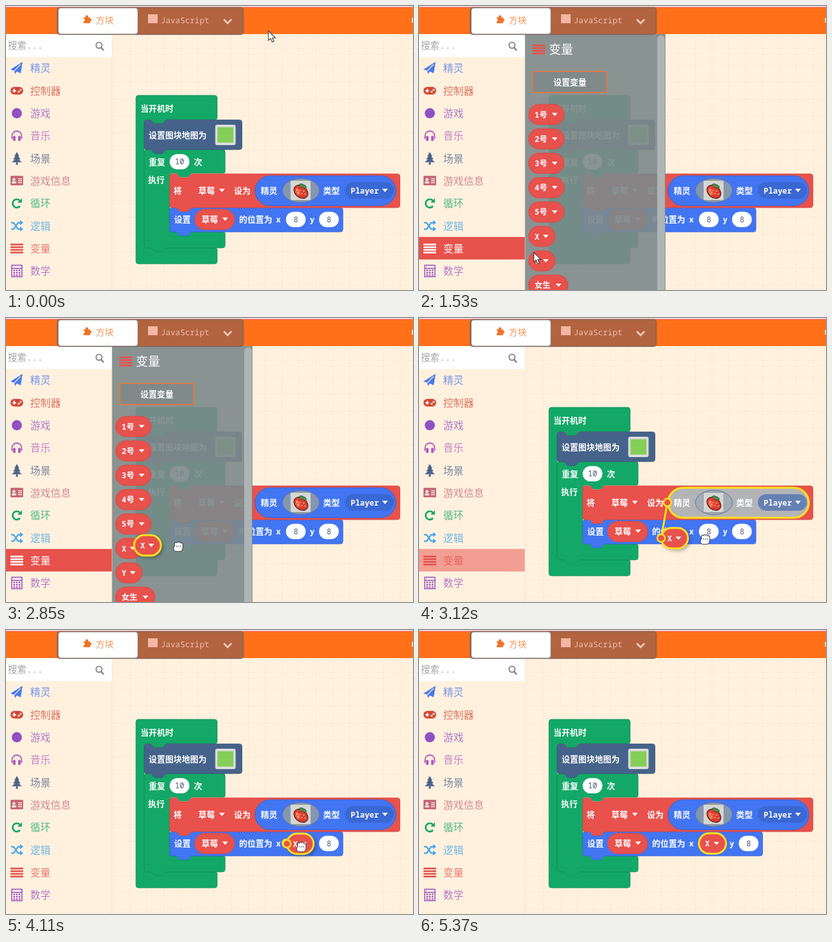
Recreate the animation shown at these times as an HTML page with a canvas. Size 639 px wide and 445 px high, loop 5.94 s.

```html
<!DOCTYPE html>
<html lang="zh">
<head>
<meta charset="utf-8">
<style>
html, body { margin: 0; width: 100%; height: 100%; overflow: hidden; background: #fff1de; }
canvas { display: block; }
</style>
</head>
<body>
<canvas id="stage" width="639" height="445"></canvas>
<script>
const c = document.getElementById('stage').getContext('2d');
const LOOP = 5940, OPEN = 1320, GRAB = 2740, CLOSE = 2860, DROP = 4600, GONE = 5350;
const LAG = 70; // the dragged block trails the pointer
const CJK = '"Noto Sans CJK SC", "Noto Sans CJK", sans-serif';
const MONO = '"Noto Sans Mono", "DejaVu Sans Mono", monospace';
const CREAM = '#fff1de', GREEN = '#13a867', RED = '#e8514c', BLUE = '#4275f2', SLATE = '#45638a', YELLOW = '#ffe01e';
const MENU = [
  ['精灵', '#4678ee'], ['控制器', '#d2493a'], ['游戏', '#9150c2'], ['音乐', '#b25cc0'],
  ['场景', '#48628a'], ['游戏信息', '#c66878'], ['循环', '#18a868'], ['逻辑', '#43a4ee'],
  ['变量', '#e2524f'], ['数学', '#9850c4']
];
const ROW = 35.3;

// Key points of the pointer: time, x, y
const PATH = [
  [0, 412, 39], [30, 412, 39], [600, 72, 346], [960, 65, 376], [OPEN, 66, 380], [1800, 326, 394],
  [2100, 240, 390], [2400, 202, 394], [2550, 196, 354], [GRAB, 196, 354], [3120, 448, 338],
  [3400, 550, 330], [3600, 494, 331], [4000, 463, 331], [4950, 462, 331], [GONE, 560, -22]
];

function pointer(t) {
  const i = Math.max(1, PATH.findIndex(p => p[0] >= t));
  const [t0, x0, y0] = PATH[i - 1], [t1, x1, y1] = PATH[i];
  const k = ramp(t, t0, t1);
  return [x0 + (x1 - x0) * k, y0 + (y1 - y0) * k];
}
function ramp(t, a, b) {
  return Math.max(0, Math.min(1, (t - a) / (b - a)));
}

function text(s, x, y, size, color, weight = 700, family = CJK, align = 'left') {
  c.font = `${weight} ${size}px ${family}`;
  c.fillStyle = color;
  c.textAlign = align;
  c.fillText(s, x, y + size * 0.37);
}
const label = (s, x, y) => text(s, x, y, 13, '#fff');
const code = (s, x, y) => text(s, x, y, 12.3, '#fff', 700, MONO);

function faded(alpha, fn) {
  c.globalAlpha = alpha;
  fn();
  c.globalAlpha = 1;
}
function moved(x, y, fn) {
  c.save();
  c.translate(x, y);
  fn();
  c.restore();
}
function paint(fill, edge, width = 1) {
  if (fill) { c.fillStyle = fill; c.fill(); }
  if (edge) { c.strokeStyle = edge; c.lineWidth = width; c.stroke(); }
}
function rect(x, y, w, h, color) {
  c.fillStyle = color;
  c.fillRect(x, y, w, h);
}
function round(x, y, w, h, r, fill, edge, width) {
  c.beginPath();
  c.roundRect(x, y, w, h, r);
  paint(fill, edge, width);
}
function disc(x, y, r, fill, edge, width) {
  c.beginPath();
  c.arc(x, y, r, 0, 7);
  paint(fill, edge, width);
}
function oval(x, y, rx, ry, tilt, fill, edge, width) {
  c.beginPath();
  c.ellipse(x, y, rx, ry, tilt, 0, 7);
  paint(fill, edge, width);
}
function trace(points) {
  c.beginPath();
  for (let i = 0; i < points.length; i += 2) c.lineTo(points[i], points[i + 1]);
}
function poly(points, fill, edge, width) {
  trace(points);
  c.closePath();
  paint(fill, edge, width);
}
function wire(points, color, width) {
  trace(points);
  paint(null, color, width);
}
const caret = (x, y) => poly([x - 4.5, y - 2.5, x + 4.5, y - 2.5, x, y + 2.5], '#fff');

// Puzzle notch along a top edge (dir 1) or a bottom edge (dir -1)
function notch(x, y, dir) {
  const a = x + 22.5 - dir * 13.5, at = d => a + dir * d;
  c.lineTo(a, y);
  c.bezierCurveTo(at(5), y, at(4), y + 6, at(9), y + 6);
  c.lineTo(at(18), y + 6);
  c.bezierCurveTo(at(23), y + 6, at(22), y, at(27), y);
}
function block(x, y, w, h, fill, edge, { hat, arm, top, bottom } = {}) {
  const r = x + w, b = y + h;
  c.beginPath();
  c.moveTo(x, y + 4);
  c.arcTo(x, y, x + 4, y, 4);
  if (!hat) notch(x, y, 1);
  c.arcTo(r, y, r, y + 4, 4);
  if (arm) {
    c.arcTo(r, top, r - 4, top, 3);
    notch(x + arm, top, -1);
    c.arcTo(x + arm, top, x + arm, top + 4, 3);
    c.arcTo(x + arm, bottom, x + arm + 4, bottom, 3);
    c.arcTo(r, bottom, r, bottom + 4, 3);
  }
  c.arcTo(r, b, r - 4, b, 4);
  if (!hat) notch(x, b, -1);
  c.arcTo(x, b, x, b - 4, 4);
  c.closePath();
  paint(fill, edge, 0.8);
}

function field(value, x, y) {
  round(x - 15.5, y - 12, 31, 24, 12, '#fff');
  text(value, x, y, 12, '#4a5666', 500, MONO, 'center');
}
function variable(name, x, y, w, edge = '#d64743', width = 0.8) {
  round(x, y - 16, w, 32, 16, RED, edge, width);
  text(name, x + 9.5, y, 12.5, '#fff', 700, `"Noto Sans Mono", ${CJK}`);
  caret(x + w - 15, y);
}

const ICONS = [
  col => {
    poly([-10, 2, 9, -10, 6, 8, 0, 5, -3, 9, -4, 4], col);
    wire([-4, 4, 6, -6], CREAM, 1.3);
  },
  col => {
    round(-10, -6, 20, 12, 6, col);
    rect(-7, -1, 6, 2, CREAM);
    rect(-5, -3, 2, 6, CREAM);
    for (const k of [-1.5, 1.5]) disc(4.5 - k, k, 1.5, CREAM);
  },
  col => disc(0, 0, 8, col),
  col => {
    c.beginPath();
    c.arc(0, 0, 7.5, Math.PI, 0);
    paint(null, col, 2);
    for (const s of [-1, 1]) {
      rect(s * 7.5 - 1, 0, 2, 5, col);
      round(s * 4 - 2, 0, 4, 8, 1.5, col);
    }
  },
  col => {
    for (let k = 0; k < 3; k++) {
      const w = 4 + k * 2, y = k * 4.5 - 3;
      poly([0, y - 7, w, y, -w, y], col);
    }
    rect(-1.5, 6, 3, 4, col);
  },
  col => {
    round(-10, -8, 20, 15, 1.5, col);
    disc(-4.5, -2, 2.3, CREAM);
    round(-8, 1, 7, 3, 1, CREAM);
    for (let k = 0; k < 3; k++) rect(2, k * 3 - 4, 6, 1.4, CREAM);
  },
  col => {
    c.beginPath();
    c.arc(0, 0, 6.5, 0.7, 5.5);
    paint(null, col, 2.8);
    poly([8, -8, 8, -1, 1, -1], col);
  },
  col => {
    for (const y of [-5, 5]) {
      wire([-9, y, -5, y, 2, -y, 6, -y], col, 2.4);
      poly([5, y - 4, 10, y, 5, y + 4], col);
    }
  },
  col => {
    for (let k = 0; k < 4; k++) rect(-10, k * 4.2 - 7.5, 20, 2.6, col);
  },
  col => {
    round(-8, -9, 16, 18, 0, null, col, 1.5);
    wire([-8, -4, 8, -4], col, 1.5);
    for (let k = 0; k < 9; k++) rect(k % 3 * 4.2 - 5.5, (k / 3 | 0) * 3.6 - 2, 2.6, 2.2, col);
  }
];

function header() {
  rect(0, 0, 639, 2, '#fdeee6');
  rect(0, 2, 639, 42, '#ff7019');
  rect(0, 1.5, 639, 1, '#e5566a');
  round(80.5, 2.5, 292, 42, 4, '#b1643f', '#80645a', 1.5);
  round(82, 3, 125, 41, 4, '#fff', '#777', 0.8);
  rect(122, 18, 10, 9, '#f47322');
  disc(127, 17, 2.4, '#f47322');
  disc(132, 22, 2.2, '#f47322');
  disc(122, 22, 1.8, '#fff');
  faded(0.8, () => text('方块', 141, 22, 14, '#f47a2c', 300));
  rect(223, 13, 15, 14, '#f2b8a4');
  text('JavaScript', 243, 22.5, 12.7, '#f3bda9', 400, MONO);
  wire([342, 21, 348, 27, 354, 21], '#f3c4b2', 3);
  rect(637.5, 19, 2, 7, '#fff');
}

function sidebar(hover, glow, open) {
  rect(0, 44, 166, 401, CREAM);
  rect(165.5, 44, 1, 401, '#f3e5cf');
  rect(0, 44, 166, 36, '#fff');
  faded(0.8, () => text('搜索...', 3, 62, 14.5, '#8c8c8c', 300, `"Noto Sans Mono", ${CJK}`));
  disc(146, 61.5, 4.6, null, '#808080', 1.8);
  wire([149, 65, 153.5, 69.5], '#808080', 2.4);
  MENU.forEach(([name, color], i) => {
    const y = 97.5 + i * ROW, active = i === 8 && open;
    if (i === hover) rect(0, y - 18, 166, ROW, '#eeedea');
    if (i === 8) faded(glow, () => rect(0, y - 18, 166, ROW, RED));
    const ink = active ? '#fff' : color;
    moved(17, y, () => ICONS[i](ink));
    faded(active ? 1 : 0.75, () => text(name, 38, y, 16, ink, active ? 500 : 300));
  });
}

function strawberry() {
  round(446.5, 273.5, 32, 31, 2, '#d5d7d4', '#9aa0a0');
  moved(462, 290, () => {
    oval(1, 1, 12, 9, 0.7, '#e23a2c', '#6a2a2c', 1.5);
    oval(-4, 1, 3, 6, -0.3, '#f2704c');
    oval(4, -8, 6, 2.5, 0.4, '#4c8f4c', '#35553a');
    for (let i = 0; i < 6; i++) rect(i * 2.6 - 6, i * 5 % 9 - 3, 2, 2, '#f9b184');
  });
}

function workspace(dropped, snap) {
  rect(166, 44, 473, 401, CREAM);
  c.setLineDash([3, 2]);
  for (let x = 168.5; x < 639; x += 26.5) wire([x, 44, x, 445], '#f7e9c8', 1);
  for (let y = 66.5; y < 445; y += 26.5) wire([166, y, 639, y], '#f7e9c8', 1);
  c.setLineDash([]);

  const edge = '#0f8f57';
  block(204, 140, 127.5, 264, GREEN, edge, { hat: true, arm: 13, top: 178, bottom: 379 });
  label('当开机时', 211, 160);
  block(217, 225, 127, 154, GREEN, edge, { arm: 40, top: 262, bottom: 354 });
  label('重复', 224, 244);
  field('10', 272.5, 244);
  label('次', 295, 244);
  label('执行', 223, 272);
  block(217, 178.5, 153.5, 46.5, SLATE, '#3a5578');
  label('设置图块地图为', 224, 202);
  round(328.5, 186, 32, 32, 3, '#d9dcd8');
  rect(332, 190, 25, 24, '#84cf58');

  block(257, 316, dropped ? 282.5 : 272, 38, BLUE, '#3966d6');
  block(257, 263, 361.5, 53, RED, '#d64743');
  label('将', 263, 289);
  label('草莓', 302, 289);
  caret(339, 289);
  label('设为', 358, 289);
  const grey = snap === 'sprite';
  round(391, 266, 221, 47, 23.5, grey ? '#b3b4b6' : BLUE, grey ? YELLOW : '#3562cc', grey ? 3 : 1);
  label('精灵', 400, 289);
  oval(463, 289, 29, 19, 0, grey ? '#a3abb4' : '#8497b0', '#5a75a6');
  strawberry();
  label('类型', 498, 289);
  round(532, 276, 77, 26, 13, grey ? '#6581b4' : '#3a68d3');
  code('Player', 541, 289);
  caret(595, 289);

  label('设置', 264, 334);
  round(296, 318.5, 63, 32, 16, RED, '#d64743', 0.8);
  label('草莓', 307, 334);
  caret(344, 334);
  label('的位置为', 366, 334);
  code('x', 424, 334);
  const shift = dropped ? 10.5 : 0;
  code('y', 477 + shift, 334);
  field('8', 507 + shift, 334.5);
  if (dropped) variable('X', 439.5, 334.5, 42.5, YELLOW, 3);
  else field('8', 455, 334.5);
}

function flyout() {
  rect(166, 44, 221, 401, 'rgba(126,138,139,.91)');
  round(374, 46, 12, 410, 6, '#aeb4b4');
  moved(188, 68, () => ICONS[8](RED));
  text('变量', 204, 68, 19, '#fff', 400);
  round(178.5, 102.5, 116, 33, 2, '#808a8b', '#f97330', 1.6);
  label('设置变量', 211, 119);
  ['1号', '2号', '3号', '4号', '5号', 'X', 'Y', '女生'].forEach((name, i) =>
    variable(name, 172, 170 + i * 38.2, name.length < 2 ? 42 : name === '女生' ? 62 : 56));
}

const SLOTS = { sprite: [390, 289], x: [440, 334], y: [492, 334] };
function slotFor(left) {
  return left < 330 ? '' : left < 412 ? 'sprite' : left < 464 ? 'x' : 'y';
}
function dragged(left, y, snap) {
  c.shadowColor = 'rgba(0,0,0,.35)';
  c.shadowBlur = 6;
  c.shadowOffsetX = c.shadowOffsetY = 3;
  round(left, y - 15, 42, 31, 15.5, RED);
  c.shadowColor = 'transparent';
  variable('X', left, y, 42, YELLOW, 3);
  if (!snap) return;
  const [sx, sy] = SLOTS[snap];
  wire([sx, sy, left, y], YELLOW, 3);
  for (const [x0, y0] of [[sx, sy], [left, y]]) disc(x0, y0, 6, RED, YELLOW, 2.5);
}

// Hand made of fingers over a palm; "reach" is how far they stretch
function hand(pointing, reach) {
  const ink = '#3a3a44';
  c.beginPath();
  c.roundRect(-6, 8, 13, 8, 4);
  for (let i = 0; i < 4; i++) {
    const top = pointing ? (i ? 7 + i * 0.7 : 0) : 5 - reach * Math.sin(0.8 + i * 0.6);
    c.roundRect(i * 3 - 4.5, top, 3, 13 - top, 1.5);
  }
  paint(null, ink, 2);
  paint('#fff');
  for (let i = 0; i < 3; i++) wire([i * 3 - 1.5, 7, i * 3 - 1.5, 10], ink, 0.7);
}
function cursor(t, x, y) {
  const dragging = t >= GRAB && t < DROP;
  const overBlock = t >= DROP && y > 262 || t > 2430 && t < GRAB && y < 378;
  moved(x, y, () => {
    if (t < 1500 && x < 166) hand(true, 0);
    else if (dragging) hand(false, 3);
    else if (overBlock) hand(false, 6);
    else poly([0, 0, 0, 15, 3.5, 11.8, 6, 17.5, 8.6, 16.3, 6.2, 11, 11, 11], '#fff', '#3a3a44', 1.1);
  });
}

function draw(t) {
  const [x, y] = pointer(t);
  const open = t >= OPEN && t < CLOSE;
  const dragging = t >= GRAB && t < DROP;
  const [bx, by] = pointer(Math.max(GRAB, t - LAG));
  const left = bx - 22;
  const snap = dragging && !open ? slotFor(left) : '';
  const row = Math.floor((y - 79.9) / ROW);
  workspace(t >= DROP, snap);
  if (open) flyout();
  sidebar(t < OPEN && x < 166 ? row : -1, ramp(t, OPEN, 1480) * (1 - ramp(t, CLOSE, 3400)), open);
  header();
  if (dragging) dragged(left, by + 4, snap);
  if (t < GONE) cursor(t, x, y);
}

function tick() {
  draw(performance.now() % LOOP);
  requestAnimationFrame(tick);
}
tick();
</script>
</body>
</html>
```
